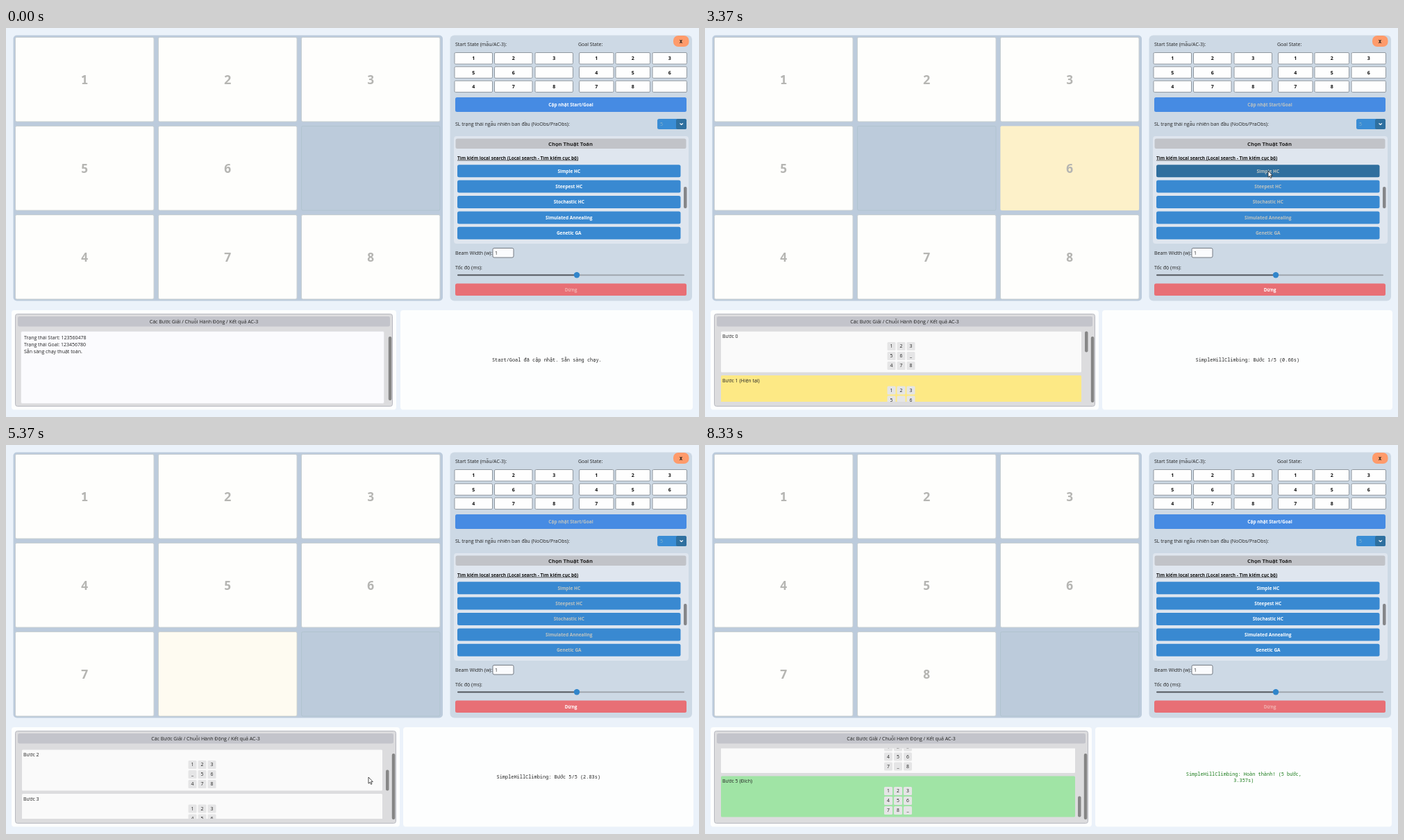
These frames come from a looping animation (998 px wide and 561 px high, 8.36 s). An HTML page:

```html
<!DOCTYPE html>
<html lang="vi">
<head>
<meta charset="utf-8">
<title>8-puzzle solver</title>
<style>
html, body { margin: 0; width: 100%; height: 100%; overflow: hidden; background: #ebf2fa; }
svg { display: block; }
text { font: 7px "Open Sans", "Noto Sans", sans-serif; fill: #222; white-space: pre; }
.mono { font-family: "Noto Sans Mono", "DejaVu Sans Mono", monospace; }
.b { font-weight: 700; }
.m { text-anchor: middle; }
</style>
</head>
<body>
<svg id="stage" width="998" height="561" viewBox="0 0 998 561">
  <defs><clipPath id="list"><rect x="20" y="437.5" width="545" height="101.5"/></clipPath></defs>
  <g id="scene"></g>
  <g id="cursor" stroke="#222" stroke-width=".8" stroke-linejoin="round" fill="#fff">
    <path id="arrow" d="M0 0V9.2L2.1 7.3 3.6 10.4 5 9.8 3.6 6.7H6.3Z"/>
    <path id="hand" d="M-.8 1Q0-.2.8 1V4.2L4 5Q5.2 5.4 4.9 7L4 10.6H-.6L-3.3 7.2Q-3.4 5.8-2 6.4L-.8 7.4Z"/>
  </g>
</svg>
<script>
const LOOP = 8360, CLICK = 2560, RUN = 2640, STEP = 543, DONE = 5970;
const STATES = ['12356_478', '1235_6478', '123_56478', '123456_78', '1234567_8', '12345678_'];
const WHEEL = [4950, 5050, 5150, 5250, 5450, 5550, 5650, 5750, 5850];
const CARET = [[240, 770], [1300, 1830], [2360, CLICK], [DONE, 6500], [7030, 7430]];
// time, x, y of the pointer tip
const PATH = [
  [700, 772, 330], [1250, 752, 106], [1750, 752, 106], [2200, 811, 206], [3900, 811, 206],
  [4530, 503, 279], [4850, 522, 479], [5980, 522, 479], [6200, 553, 539], [6700, 553, 539]
];
const ALGOS = ['Simple HC', 'Steepest HC', 'Stochastic HC', 'Simulated Annealing', 'Genetic GA'];

const $ = id => document.getElementById(id);
const clamp = (v, a, b) => Math.min(b, Math.max(a, v));
const during = (t, a, b) => t >= a && t < b;

// Boxes are given by their edges.
const box = (x1, y1, x2, y2, fill, r = 0, more = '') =>
  `<rect x="${x1}" y="${y1}" width="${x2 - x1}" height="${y2 - y1}" rx="${r}" fill="${fill}" ${more}/>`;
const line = color => `stroke="${color}"`;
// Text is placed by the middle of its capitals.
const label = (s, x, y, { size = 7, cls = '', fill = '#222', more = '' } = {}) =>
  `<text class="${cls}" x="${x}" y="${y + size * .36}" style="font-size:${size}px;fill:${fill}" ${more}>${s}</text>`;
const button = (s, x1, y1, x2, y2, fill, color) =>
  box(x1, y1, x2, y2, fill, 2.5) +
  label(s, (x1 + x2) / 2, (y1 + y2) / 2, { size: 6.5, cls: 'b m', fill: color });

function board(step, age) {
  const state = STATES[step];
  const moved = step > 0 ? STATES[step - 1].indexOf('_') : -1;
  let out = box(10.5, 10.5, 629, 393.5, '#bccbdc', 5);
  [...state].forEach((digit, i) => {
    const x = 13.5 + i % 3 * 206, y = 13.5 + Math.floor(i / 3) * 128;
    const tile = (fill, more) => box(x, y, x + 199.5, y + 121.5, fill, 2, more);
    if (digit === '_') {
      out += tile('#bccbdb', line('#b1c4cf'));
      return;
    }
    out += tile('#fefefc', line('#c9d0d2'));
    if (i === moved && age < 250) {
      const glow = age < 120 ? .1 + age / 133 : clamp((250 - age) / 45, 0, 1);
      out += tile('#fdf1c9', `opacity="${glow.toFixed(2)}"`);
      if (age < 40) return;
    }
    out += label(digit, x + 99.7, y + 60.8, { size: 18, cls: 'mono b m', fill: '#b5b5b2' });
  });
  return out;
}

function fields(state, columns, width) {
  return [...state].map((digit, i) => {
    const x = columns[i % 3], y = 35.5 + Math.floor(i / 3) * 20.3;
    return box(x, y, x + width, y + 16.5, '#fefefe', 1.5, line('#8f979f')) +
      (digit === '_' ? '' : label(digit, x + width / 2, y + 8.2, { cls: 'b m', fill: '#111' }));
  }).join('');
}

function controls(t, running) {
  const text = running ? '#bfc4c0' : '#fff';
  const hoverUpdate = during(t, 1220, 1800);
  const hoverSimple = during(t, 2170, 3980);
  let out = box(639.5, 10.5, 988, 393.5, '#cdd9e5', 6) +
    box(961, 11, 983.5, 27, '#ff9b6b', 7) +
    label('X', 972, 19, { size: 7.5, cls: 'mono b m', fill: '#111' }) +
    label('Start State (mẫu/AC-3):', 647, 23) + label('Goal State:', 824, 23) +
    fields(STATES[0], [646, 703.5, 762], 54.5) +
    fields(STATES[5], [825.5, 878, 931], 49.5);
  if (CARET.some(([a, b]) => during(t, a, b))) out += box(852, 38.5, 853, 49, '#111');
  out += button('Cập nhật Start/Goal', 647, 100, 980, 121, hoverUpdate ? '#609fea' : '#468be3', text) +
    label('SL trạng thái ngẫu nhiên ban đầu (NoObs/PraObs):', 647, 138.5) +
    box(938, 131, 980, 146, '#3a8dd5', 2.5) + box(965, 131, 980, 146, '#2f709f', 2.5) +
    label('5', 942, 138.5, { fill: '#86b3ca' }) +
    '<path d="M970.5 137.5l2.2 2 2.2-2" fill="none" stroke="#fff" stroke-width="1.2"/>' +
    box(645, 156, 983, 311, '#dfe6ef', 4) + box(647.5, 159.5, 979.5, 174, '#c1c3c8', 2.5) +
    label('Chọn Thuật Toán', 813, 166.8, { size: 7.6, cls: 'b m' }) +
    label('Tìm kiếm local search (Local search - Tìm kiếm cục bộ)', 650, 187.3,
      { size: 6.5, cls: 'b', fill: '#111', more: 'text-decoration="underline"' });
  ALGOS.forEach((name, i) => {
    const y = 197.2 + i * 22.4;
    out += button(name, 650, y, 971.5, y + 18, i === 0 && hoverSimple ? '#306f9e' : '#3989d1', text);
  });
  return out + box(976, 229, 980.5, 260, '#858689', 2) +
    label('Beam Width (w):', 647, 324.3) +
    box(701, 317.5, 731, 331, '#fbfcfe', 2, line('#747a82')) + label('1', 704, 324.3) +
    label('Tốc độ (ms):', 647, 345.3) +
    box(650, 355.4, 977, 357.2, '#9aa0a7', 1) + box(650, 355.4, 822, 357.2, '#50555b', 1) +
    '<circle cx="822" cy="356.3" r="4.2" fill="#3085cb"/>' +
    button('Dừng', 647, 368.5, 980, 386, '#e86f75', running ? '#fff' : '#f0b3b1');
}

function stepCard(k, y, right, current) {
  const goal = k === 5;
  const fill = goal ? '#a0e4a5' : k === current ? '#fde985' : '#fafafa';
  const note = goal ? ' (Đích)' : k === current ? ' (Hiện tại)' : '';
  const mid = (23 + right) / 2;
  return box(23, y, right, y + 59, fill, 1.5) + label(`Bước ${k}${note}`, 25, y + 7) +
    [...STATES[k]].map((digit, i) => {
      const cx = mid + (i % 3 - 1) * 14, cy = y + 21.5 + Math.floor(i / 3) * 14;
      return box(cx - 6, cy - 6, cx + 6, cy + 6, '#e5e5e6', 1.5) +
        label(digit, cx, cy, { size: 6.8, cls: 'm' });
    }).join('');
}

function history(t, phase, step) {
  const right = [562, 567, 557][phase];
  const hoverBar = during(t, 6160, 6700);
  let out = box(8, 407, right, 550.5, '#fdfefe', 4) +
    box(13.5, 412.5, right - 5.5, 545.5, '#dcdcde', 3, line('#b7b8c0')) +
    box(17, 416, right - 9, 430.5, '#c3c4cb', 2.5) +
    label('Các Bước Giải / Chuỗi Hành Động / Kết quả AC-3', right / 2 + 4, 423.3, { cls: 'm' }) +
    box(right - 11.2, 445, right - 6.7, phase ? 540 : 537, hoverBar ? '#555' : '#858585', 2);
  if (phase === 0) {
    return out + box(21.5, 437.5, 544.5, 541.5, '#fbfbfe', 2, line('#e4e4e8')) +
      ['Trạng thái Start: 123560478', 'Trạng thái Goal: 123456780', 'Sẵn sàng chạy thuật toán.']
        .map((s, i) => label(s, 26, 446.5 + i * 9.8)).join('');
  }
  const offset = Math.min(277.5, 31.25 * WHEEL.filter(at => t >= at).length);
  const cardRight = right - (phase === 1 ? 25 : 24);
  const cards = STATES.map((_, k) => stepCard(k, 437.5 + k * 63.5 - offset, cardRight, step)).join('');
  const bar = 437.5 + offset / 277.5 * 69;
  return out + `<g clip-path="url(#list)">${cards}</g>` +
    box(right - 20, bar, right - 15.5, bar + 30, '#878787', 2);
}

function status(phase, step) {
  const [left, right] = [[568, 989], [572, 990], [562, 989]][phase];
  const lines = [
    ['Start/Goal đã cập nhật. Sẵn sàng chạy.'],
    [`SimpleHillClimbing: Bước ${step}/5 (${(.117 + step * .5425).toFixed(2)}s)`],
    ['SimpleHillClimbing: Hoàn thành! (5 bước,', '3.357s)']
  ][phase];
  return box(left, 407, right, 550.5, '#fdfefe', 4) + lines.map((s, i) =>
    label(s, (left + right) / 2 + .3, 478.8 + (i - (lines.length - 1) / 2) * 9,
      { size: 6.93, cls: 'mono m', fill: phase === 2 ? '#187a18' : '#222' })).join('');
}

function placeCursor(t) {
  const next = PATH.findIndex(p => p[0] > t);
  $('cursor').style.display = next > 0 ? '' : 'none';
  if (next < 1) return;
  const [t0, x0, y0] = PATH[next - 1], [t1, x1, y1] = PATH[next];
  const p = (t - t0) / (t1 - t0), ease = p * p * (3 - 2 * p);
  $('cursor').setAttribute('transform', `translate(${x0 + (x1 - x0) * ease} ${y0 + (y1 - y0) * ease})`);
  const pointing = during(t, 1220, 1800) || during(t, 2170, CLICK);
  $('hand').style.display = pointing ? '' : 'none';
  $('arrow').style.display = pointing ? 'none' : '';
}

let shown = '';
function render(t) {
  const phase = t < CLICK ? 0 : t < DONE ? 1 : 2;
  const step = clamp(Math.floor((t - RUN) / STEP), 0, 5);
  const age = t - RUN - step * STEP;
  const markup = board(step, age) + controls(t, phase === 1) + history(t, phase, step) + status(phase, step);
  if (markup !== shown) $('scene').innerHTML = shown = markup;
  placeCursor(t);
}

const start = performance.now();
function tick() {
  render((performance.now() - start) % LOOP);
  requestAnimationFrame(tick);
}
tick();
</script>
</body>
</html>
```
